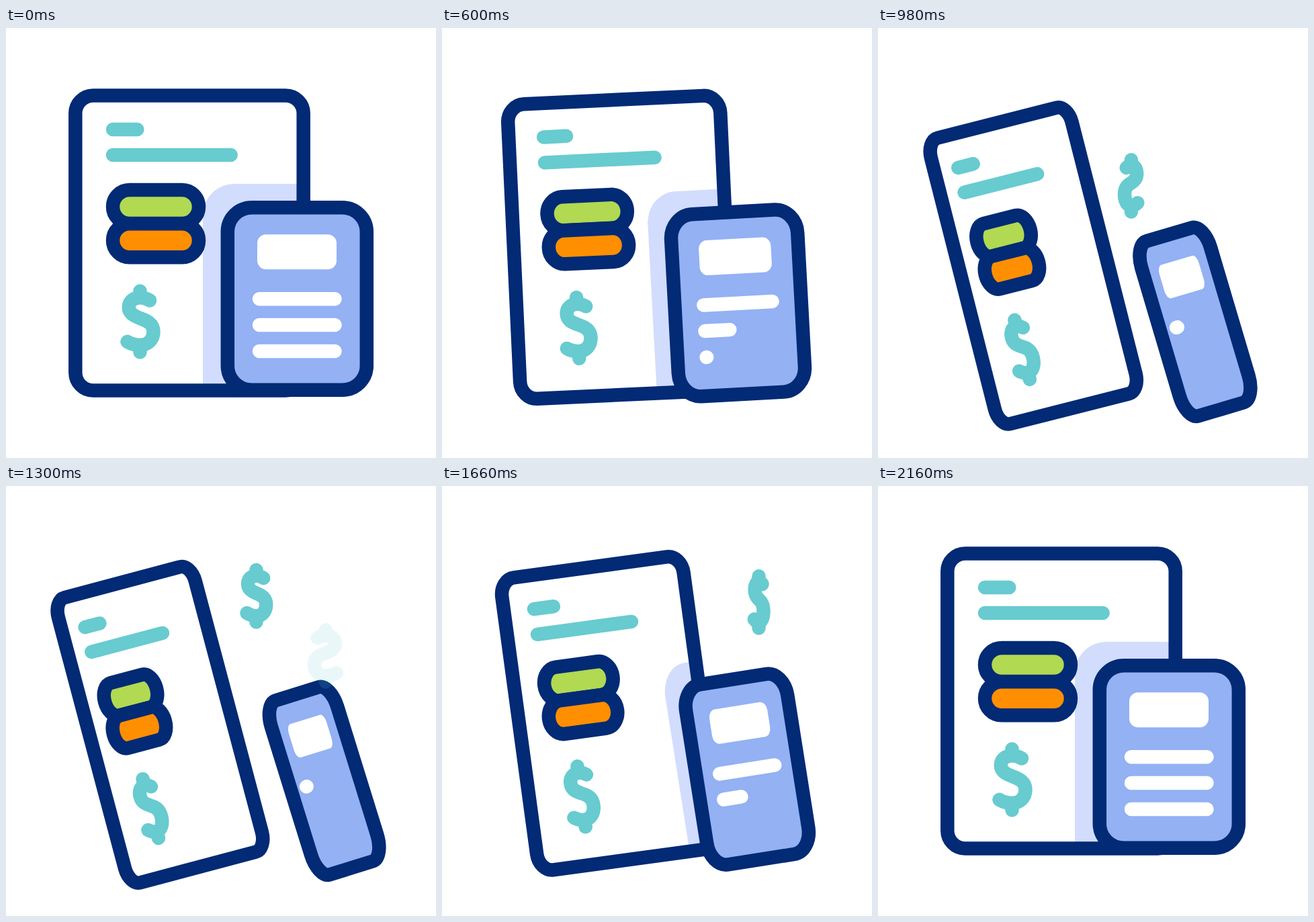
These frames come from a looping animation (640 px wide and 640 px high, 2.4 s). An HTML page without scripts:

```html
<!DOCTYPE html>
<html lang="en">
<head>
<meta charset="utf-8">
<title>Invoice and calculator</title>
<style>
  /* --t: clock in ms, --p: how far the two objects have swung */
  @property --t { syntax: "<number>"; inherits: true; initial-value: 0; }
  @property --p { syntax: "<number>"; inherits: true; initial-value: 0; }
  @keyframes clock { from { --t: 0; } to { --t: 2400; } }
  @keyframes swing {
    0%, 10.5% { --p: 0; }
    50% { --p: 1; }
    88.75%, 100% { --p: 0; }
  }

  html, body { margin: 0; width: 100%; height: 100%; overflow: hidden; background: #fff; }
  svg {
    display: block; width: 640px; height: 640px;
    animation: clock 2.4s linear infinite, swing 2.4s cubic-bezier(.7, 0, .3, 1) infinite;
  }
  path, rect { vector-effect: non-scaling-stroke; }

  .ink { fill: none; stroke: #022a75; stroke-width: 20.5; }
  .teal { fill: none; stroke: #67cbd0; stroke-width: 20.5; stroke-linecap: round; stroke-linejoin: round; }
  .shade { fill: #d2dcfd; }
  .body { fill: #93b1f3; }
  .green { fill: #b1d952; }
  .orange { fill: #ff8f00; }
  .white { fill: #fff; }

  .sheet {
    transform: translate(calc(273px - 44px * var(--p)), calc(320px + 35.7px * var(--p)))
      rotate(calc(-15deg * var(--p))) scaleX(calc(1 - .382 * var(--p)));
  }
  .calc {
    transform: translate(calc(433.3px + 40.7px * var(--p)), calc(403px + 36.2px * var(--p)))
      rotate(calc(-17.4deg * var(--p))) scaleX(calc(1 - .508 * var(--p)));
  }

  /* a row shrinks from --out on, grows again from --in on, with a cubic ease in and out */
  .row {
    --d: 420;
    --k: clamp(0, max(1 - (var(--t) - var(--out)) / var(--d), (var(--t) - var(--in)) / 420), 1);
    --a: min(var(--k), .5);
    --b: min(1 - var(--k), .5);
    --len: (.5 + 4 * var(--a) * var(--a) * var(--a) - 4 * var(--b) * var(--b) * var(--b));
    fill: none; stroke: #fff; stroke-width: 20.5; stroke-linecap: round;
    transform: scaleX(max(.005, var(--len)));
  }
  .gone { opacity: calc(999 * var(--len)); }

  /* rises for 780 ms while turning about its upright axis */
  .coin {
    --age: clamp(0, var(--t) - var(--start), 780);
    opacity: clamp(0, min(var(--age), 780 - var(--age)) / 150, 1);
    transform: translate(var(--x), calc(var(--y) - .222px * var(--age)))
      scale(calc(-.85 * cos(.3deg * min(var(--age), 600))), .85);
  }
</style>
</head>
<body>
<svg viewBox="0 0 640 640" xmlns="http://www.w3.org/2000/svg">
  <defs>
    <path id="cash" d="M14.5-31.5C9.5-34.7 4.5-35.7 0-35.7C-9.5-35.7-16.7-30-16.7-21.5C-16.7-13-11-9.5 0-5C12.5-.5 20 4 20 15C20 27 11.5 35 0 35C-7.5 35-13.5 33-19 29.8M0-45.5V-36M0 35V45.5"/>
  </defs>

  <g class="calc">
    <rect class="shade" x="-140.3" y="-171" width="254" height="340" rx="47"/>
  </g>

  <g class="sheet">
    <!-- white around the sheet trims the shadow -->
    <path class="white" fill-rule="evenodd" d="M-2000-900H2000V900H-2000ZM-143-219.5H143A26.5 26.5 0 0 1 169.7-193V193A26.5 26.5 0 0 1 143 219.5H-143A26.5 26.5 0 0 1-169.7 193V-193A26.5 26.5 0 0 1-143-219.5Z"/>
    <rect class="ink" x="-169.7" y="-219.5" width="339.4" height="439" rx="26.5"/>
    <path class="teal" d="M-114-169H-77.7M-114-131H61.7"/>
    <rect class="ink green" x="-114" y="-79" width="128" height="50" rx="25"/>
    <rect class="ink orange" x="-114" y="-28.8" width="128" height="50" rx="25"/>
    <use href="#cash" class="teal" x="-73.5" y="117"/>
  </g>

  <g class="calc">
    <rect class="ink body" x="-103.5" y="-135.7" width="207" height="271.4" rx="36"/>
    <rect class="white" x="-59.3" y="-95.7" width="118" height="52" rx="13"/>
    <g transform="translate(-56.3 .3)">
      <path class="row" style="--out: 645; --in: 1240" d="M0 0H112.5"/>
    </g>
    <g transform="translate(-56.3 39)">
      <path class="row gone" style="--out: 430; --in: 1480; --d: 310" d="M0 0H112.5"/>
    </g>
    <g transform="translate(-56.3 78)">
      <path class="row gone" style="--out: 232; --in: 1740" d="M0 0H112.5"/>
    </g>
  </g>

  <g class="coin" style="--start: 800; --x: 375.1px; --y: 275px">
    <use href="#cash" class="teal" x="-3.6"/>
  </g>
  <g class="coin" style="--start: 1280; --x: 472.8px; --y: 257.5px">
    <use href="#cash" class="teal" x="-3.6"/>
  </g>
</svg>
</body>
</html>
```
